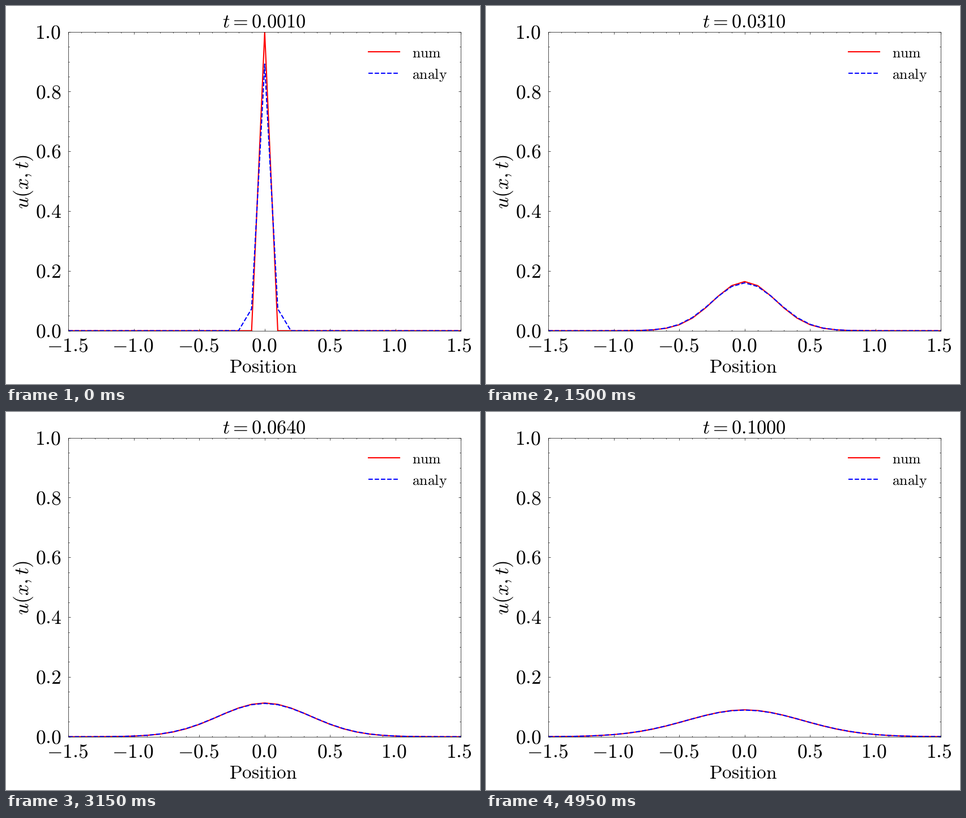
A matplotlib script for the animation above (5000 ms loop, 837 by 669 pixels).

```python
import numpy as np
import matplotlib.pyplot as plt
from matplotlib.animation import FuncAnimation
from matplotlib.lines import Line2D
from matplotlib.ticker import MultipleLocator, NullFormatter
from matplotlib.transforms import Affine2D

W, H, DPI = 837, 669, 100
LEFT, RIGHT, TOP, BOTTOM = 110.3, 803.3, 45.7, 574.7
FRAMES, INTERVAL = 100, 50
DX, DT = 0.1, 0.001
LW = 1.5

plt.rcParams.update({
    "mathtext.fontset": "cm",
    "text.hinting": "none",
    "axes.linewidth": 0.5,
})

# the tiny surplus keeps the pixel size from rounding down
fig = plt.figure(figsize=((W + 1e-3) / DPI, (H + 1e-3) / DPI), dpi=DPI,
                 facecolor="white")
# pixel coordinates with the origin at the top left
pixels = Affine2D().scale(1 / W, -1 / H).translate(0, 1) + fig.transFigure


def label(x, y, s, size, ha="center", **kw):
    return fig.text(x, y, s, fontsize=size, ha=ha, va="baseline",
                    transform=pixels, **kw)


ax = fig.add_axes([LEFT / W, 1 - BOTTOM / H,
                   (RIGHT - LEFT) / W, (BOTTOM - TOP) / H])
ax.set(xlim=(-1.5, 1.5), ylim=(0, 1))
for axis, major, minor in ((ax.xaxis, 0.5, 0.1), (ax.yaxis, 0.2, 0.05)):
    axis.set_major_locator(MultipleLocator(major))
    axis.set_minor_locator(MultipleLocator(minor))
    axis.set_major_formatter(NullFormatter())
ax.tick_params(which="both", direction="in", top=True, right=True, width=0.5)
ax.tick_params(which="major", length=3)
ax.tick_params(which="minor", length=1.5)

# tick labels, with small optical shifts
for v in np.arange(-3, 4) / 2:
    shift = -2.2 if v < 0 else -3.2 if v >= 1 else -0.4
    x = LEFT + (v + 1.5) / 3 * (RIGHT - LEFT) + shift
    label(x, 612, f"${v:.1f}$", 25.6)
for v in np.arange(6) / 5:
    y = BOTTOM - v * (BOTTOM - TOP) + 12.3
    label(96.8 if v == 1 else 98, y, f"${v:.1f}$", 25.6, ha="right")

label(454.5, 649.5, r"$\mathrm{Position}$", 24)
label(40, 310.5, "$u(x,t)$", 25.8, rotation=90, rotation_mode="anchor")
title = label(456, 38, "", 24.8)

# legend
for y, name, color, style in ((81, "num", "red", "-"),
                              (119.3, "analy", "blue", "--")):
    fig.add_artist(Line2D([640.2, 695.2], [y, y], color=color, ls=style,
                          lw=LW, transform=pixels))
    label(716.5, y + 10, rf"$\mathrm{{{name}}}$", 18.5, ha="left")

# explicit diffusion steps from a unit spike, on a domain wider than the view
x = np.arange(-30, 31) * DX
steps = [np.where(np.arange(x.size) == x.size // 2, 1.0, 0.0)]
for _ in range(FRAMES - 1):
    u = steps[-1].copy()
    u[1:-1] += DT / DX**2 * np.diff(u, 2)
    steps.append(u)

seen = slice(15, 46)
num, = ax.plot([], [], color="red", lw=LW)
analy, = ax.plot([], [], color="blue", ls="--", lw=LW)


def draw(i):
    t = (i + 1) * DT
    exact = DX / np.sqrt(4 * np.pi * t) * np.exp(-x**2 / (4 * t))
    num.set_data(x[seen], steps[i][seen])
    analy.set_data(x[seen], exact[seen])
    title.set_text(f"$t = {t:.4f}$")
    return num, analy, title


anim = FuncAnimation(fig, draw, frames=FRAMES, interval=INTERVAL,
                     repeat=True, repeat_delay=0, blit=False)
plt.show()
```
